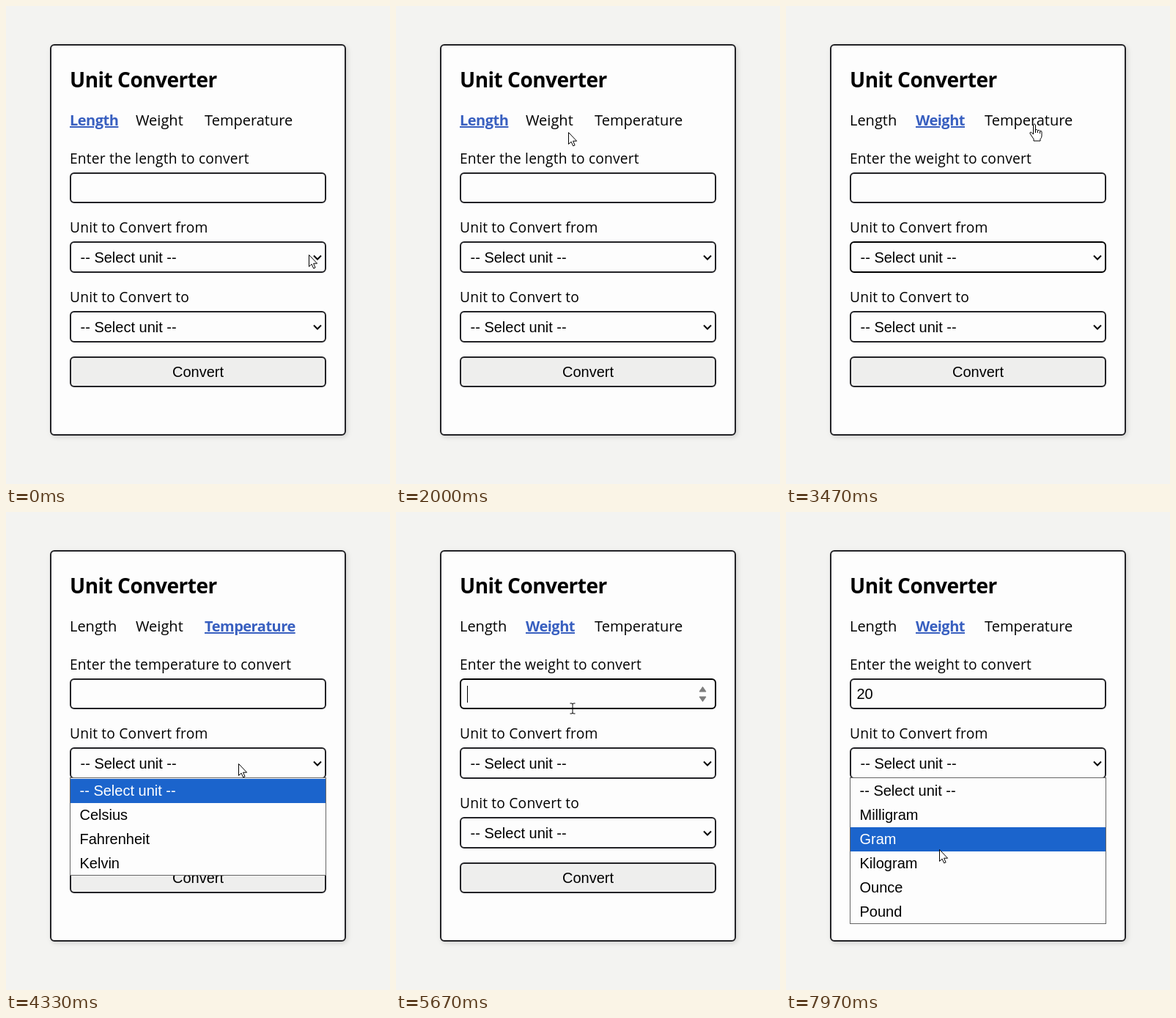
Recreate the animation shown at these times as an HTML page. Size 524 by 652 pixels, loop 8000 ms.

```html
<!DOCTYPE html>
<html lang="en">
<head>
<meta charset="utf-8">
<title>Unit Converter</title>
<style>
  html, body { margin: 0; width: 100%; height: 100%; overflow: hidden; background: #f3f3f1; }
  svg { display: block; }
  text { fill: #000; font: 20px "Liberation Sans", Arial, sans-serif; white-space: pre; }
  .comic { font-family: "Open Sans", "Noto Sans", sans-serif; }
  .title { font-size: 28px; font-weight: 700; letter-spacing: -.5px; }
  .label { font-size: 19.2px; letter-spacing: .2px; }
  .active { fill: #385fc0; font-weight: 700; letter-spacing: -.5px; text-decoration: underline; }
  .box { fill: #fdfdfd; stroke: #222226; stroke-width: 2; }
  .focus { stroke: #000; }
  .card { filter: drop-shadow(2px 2px 3px #0002); }
  .button { fill: #eeeeed; }
  .list { fill: #fdfdfd; stroke: #666; }
  .hover { fill: #1b64cc; }
  .hoverText { fill: #fff; }
  .chevron { fill: none; stroke: #000; stroke-width: 2; }
  .spinner { fill: #7d7d7d; stroke: #7d7d7d; stroke-linejoin: round; }
  .cursor { fill: #fff; stroke: #000; stroke-linejoin: round; }
</style>
</head>
<body>
<svg id="stage" width="524" height="652" viewBox="0 0 524 652"></svg>
<script>
const LOOP = 8000, ROW = 33, LIST_TOP = 364;
const PLACEHOLDER = '-- Select unit --';
const tabs = [
  { name: 'Length', x: 87, width: 64, units: ['Millimeter', 'Centimeter', 'Meter', 'Kilometer', 'Inch', 'Foot', 'Yard', 'Mile'] },
  { name: 'Weight', x: 177, width: 68, units: ['Milligram', 'Gram', 'Kilogram', 'Ounce', 'Pound'] },
  { name: 'Temperature', x: 271, width: 121, units: ['Celsius', 'Fahrenheit', 'Kelvin'] }
];

// The pointer's journey; everything else follows from what it clicks.
const stop = (time, x, y) => ({ time, x, y });
const click = (time, x, y) => ({ time, x, y, pressed: true });
const journey = [
  click(60, 413, 339), click(700, 385, 285),
  stop(2000, 235, 172), click(2250, 215, 160),
  click(2750, 255, 343), click(3120, 262, 346),
  stop(3470, 339, 161), click(3560, 339, 161),
  click(4220, 317, 343), click(4600, 317, 343),
  click(5060, 214, 158), click(5540, 241, 268),
  stop(6800, 241, 268), click(7210, 252, 322),
  stop(7970, 209, 460)
];

const clamp = (v, low, high) => Math.max(low, Math.min(high, v));
const text = (x, y, value, cls = '') => `<text x="${x}" y="${y}" class="${cls}">${value}</text>`;
const box = (y, h, cls = '') =>
  `<rect x="88" y="${y}" width="348" height="${h}" rx="5" class="box ${cls}"/>`;
const select = (y, cls) => box(y, 41, cls) + text(101.5, y + 28, PLACEHOLDER) +
  `<path class="chevron" d="M420 ${y + 18.5}l5 5 5-5"/>`;

function hitTest({ x, y }) {
  const tab = tabs.findIndex(({ x: left, width }) => x > left && x < left + width);
  if (tab >= 0 && y > 143 && y < 169) return { kind: 'tab', tab };
  const inside = (top, bottom) => x > 87 && x < 437 && y > top && y < bottom;
  return { kind: inside(227, 269) ? 'input' : inside(321, 364) ? 'from' : '' };
}

function pointerAt(t) {
  const next = journey.find(({ time }) => time > t);
  const last = journey.filter(({ time }) => time <= t).pop();
  if (!next || !last) return next || last;
  const p = (t - last.time) / (next.time - last.time), ease = p * p * (3 - 2 * p);
  return { x: last.x + (next.x - last.x) * ease, y: last.y + (next.y - last.y) * ease };
}

function stateAt(t) {
  const state = { tab: 0, focus: '', open: false, since: 0 };
  for (const press of journey.filter(({ pressed, time }) => pressed && time <= t)) {
    const { kind, tab = state.tab } = hitTest(press);
    Object.assign(state, {
      tab, since: press.time, open: kind === 'from' && !state.open, focus: kind === 'tab' ? '' : kind
    });
  }
  return state;
}

function pointer({ x, y }) {
  const shapes = {
    tab: '<path d="M-1.5 14V1Q0-1.5 1.5 1V8q2-1.5 3 .7 2-1 3 .7 2.5-.5 2.5 1.6V16q0 3-2 4.5V23H-1v-2.5L-6 13q-.5-2 1.500-2z"/><path d="M1.5 8v4M4.5 9v3M7.5 10v3"/>',
    input: '<path fill="none" d="M-3.5-7h2.5l1 1 1-1h2.5M0-6V6M-3.5 7h2.5l1-1 1 1h2.5"/>'
  };
  const arrow = '<path d="M.5 .5V16.5l3.6-3.4 2.6 5.8 2.4-1-2.5-5.7h5z"/>';
  return `<g class="cursor" transform="translate(${x} ${y})">${shapes[hitTest({ x, y }).kind] || arrow}</g>`;
}

function dropDown(units, age, pointerY) {
  const options = [PLACEHOLDER, ...units], height = options.length * ROW + 1;
  if (age < 50) return `<rect class="button" x="87" y="362" width="350" height="${height + 1}"/>`;
  const hover = clamp(Math.floor((pointerY - LIST_TOP) / ROW), 0, options.length - 1);
  return `<rect class="list" x="87.5" y="362.5" width="349" height="${height}"/>
    <rect class="hover" x="88" y="${LIST_TOP + hover * ROW}" width="348" height="${ROW}"/>` +
    options.map((name, i) =>
      text(100.5, LIST_TOP + 23 + i * ROW, name, i === hover ? 'hoverText' : '')).join('');
}

function numberInput(t, { focus, since }) {
  const value = '20'.slice(0, clamp(Math.floor((t - 5900) / 250), 0, 2));
  const field = box(228, 40, focus === 'input' ? 'focus' : '') + text(96.5, 255, value);
  if (focus !== 'input') return field;
  const caretOn = (t - since) % 1060 < 530;
  return field + '<path class="spinner" d="M414 245l4.5-6.5 4.5 6.5zM414 252l4.5 6.5 4.5-6.5z"/>' +
    (caretOn ? `<path stroke="#000" d="M${97.5 + value.length * 11} 237v23"/>` : '');
}

function draw(t) {
  const state = stateAt(t), current = tabs[state.tab], mouse = pointerAt(t);
  stage.innerHTML = `
    <rect x="61" y="53" width="402" height="532" rx="5" class="box card"/>
    ${text(87, 111, 'Unit Converter', 'comic title')}
    ${tabs.map(tab => text(tab.x, 163, tab.name, tab === current ? 'comic active' : 'comic')).join('')}
    ${text(87, 215, `Enter the ${current.name.toLowerCase()} to convert`, 'comic label')}
    ${numberInput(t, state)}
    ${text(87, 309, 'Unit to Convert from', 'comic label')}
    ${select(322, state.focus === 'from' && !state.open ? 'focus' : '')}
    ${text(87, 404, 'Unit to Convert to', 'comic label')}
    ${select(417, '')}
    ${box(479, 40, 'button')}
    ${text(227, 506, 'Convert')}
    ${state.open ? dropDown(current.units, t - state.since, mouse.y) : ''}
    ${pointer(mouse)}`;
}

const stage = document.getElementById('stage');
const start = performance.now();
function tick() {
  draw((performance.now() - start) % LOOP);
  requestAnimationFrame(tick);
}
tick();
</script>
</body>
</html>
```
